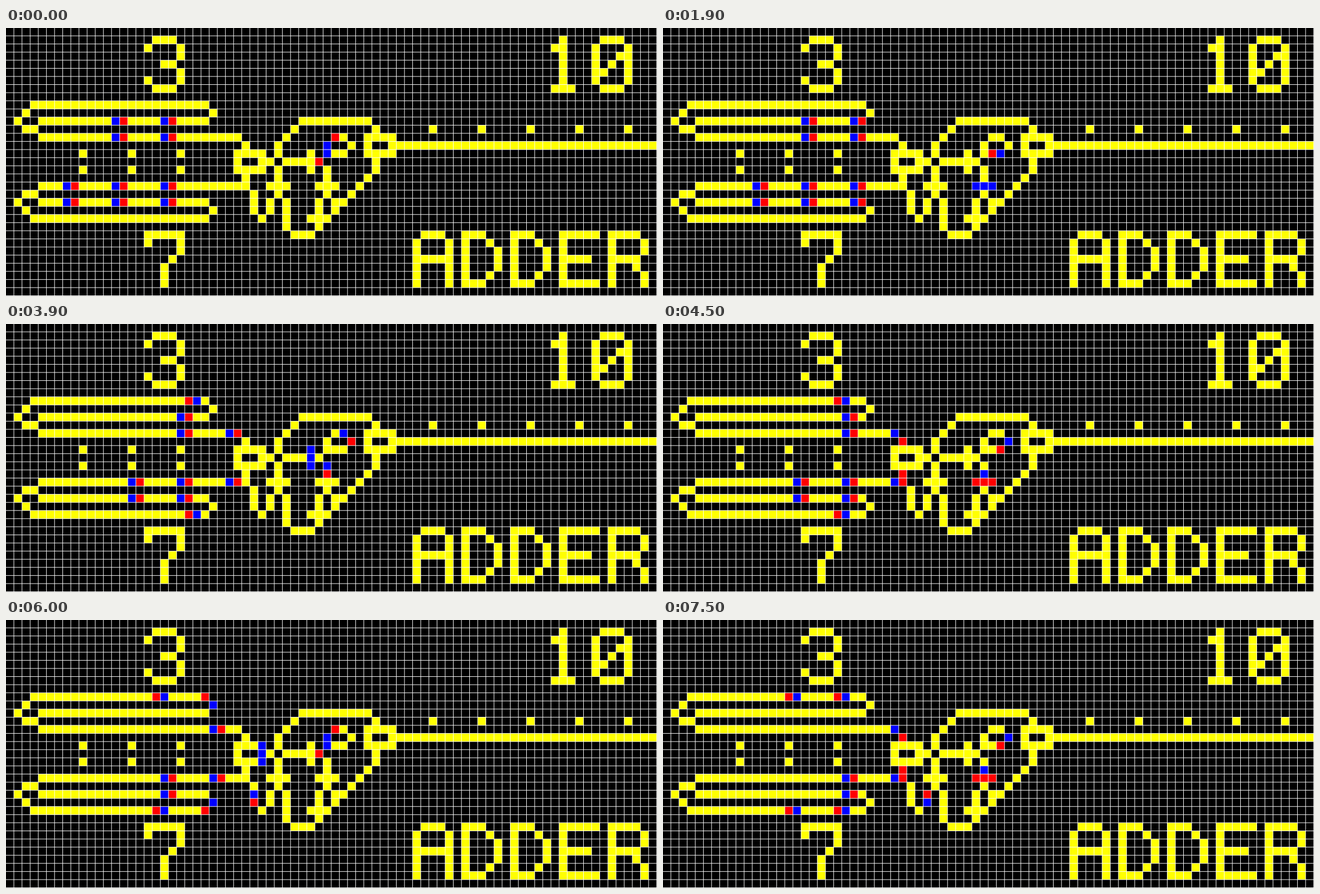
Write an HTML page with a canvas that moves like this. It is 1165 px wide and 481 px high and loops after 8000 ms.

```html
<!DOCTYPE html>
<html lang="en">
<head>
<meta charset="utf-8">
<title>Wireworld adder</title>
<style>
html, body { margin: 0; width: 100%; height: 100%; overflow: hidden; background: #000; }
canvas { display: block; }
</style>
</head>
<body>
<canvas id="stage" width="1165" height="481"></canvas>
<script>
const COLS = 80, ROWS = 33, CELL = 15, W = 1165, H = 481, LOOP = 8000;
const EMPTY = 0, WIRE = 1, HEAD = 2, TAIL = 3;
const COLORS = ['#000', '#ff0', '#f00', '#00f'];

// Single pen strokes in compass moves; digits start near the top, letters at the base.
const GLYPHS = {
  0: 'S4 SE E2 NE N4 NW W2 SW S4 NE3',
  1: 'NE S6 W E2',
  3: 'NE E2 SE S SW W E SE S SW W2 NW',
  7: 'N E4 S2 SW2 S2',
  A: 'N5 NE E2 SE S5 N3 W4',
  D: 'N6 E2 SE2 S2 SW2 W2',
  E: 'E4 W4 N3 E3 W3 N3 E4',
  R: 'N6 E3 SE S SW W3 E3 S SE S'
};

const at = (x, y) => y * COLS + x;

function build() {
  const grid = new Uint8Array(COLS * ROWS);

  const wire = (x, y, moves = '') => {
    grid[at(x, y)] = WIRE;
    for (const [, dir, count] of moves.matchAll(/([NESW]+)(\d*)/g)) {
      const dx = dir.includes('E') - dir.includes('W');
      const dy = dir.includes('S') - dir.includes('N');
      for (let i = 0; i < (count || 1); i++) grid[at(x += dx, y += dy)] = WIRE;
    }
  };
  const flip = moves => moves.replace(/[NS]/g, c => c === 'N' ? 'S' : 'N');
  const write = (text, x, y) => [...text].forEach((c, i) => wire(x + i * 6, y, GLYPHS[c]));
  const xor = (x, y) => wire(x, y, 'E3 S2 W3 N2');
  const bar = (x, y) => wire(x, y, 'E2');

  // mirrored input loops
  const input = 'E20 NE NW W21 SW2 SE E SE E24 SE';
  wire(4, 11, input);
  wire(4, 21, flip(input));

  // first half adder
  xor(28, 15);
  wire(28, 19, 'E SE S2 SE NE N NE');
  wire(31, 16, 'E NE N NE3 E8 SE');
  wire(32, 16, 'SE S3 SE S3 SE E2 NE8 N');
  bar(32, 19);

  // clock and carry loop
  wire(34, 16, 'E4 NE N NE E SE SW W');
  wire(37, 15, 'S2');
  wire(38, 16, 'SE S3 SE S SW NW N NE');
  bar(38, 19);
  bar(37, 23);

  // second half adder and output
  xor(44, 13);
  wire(47, 14, 'E32');

  for (const x of [9, 15, 21]) [15, 17].forEach(y => wire(x, y));
  for (let x = 52; x < COLS; x += 6) wire(x, 12);

  write('3', 17, 2);
  write('7', 17, 26);
  write('1', 67, 2);
  write('0', 72, 2);
  write('ADDER', 50, 31);

  const electron = (x, y, dx, dy) => {
    grid[at(x, y)] = HEAD;
    grid[at(x + dx, y + dy)] = TAIL;
  };
  for (const y of [11, 13, 19, 21])
    for (let x = y < 16 ? 14 : 8; x <= 20; x += 6) electron(x, y, -1, 0);
  electron(40, 13, -1, 1);
  electron(38, 16, 1, -1);
  return grid;
}

function next(grid) {
  const heads = (x, y) => {
    let n = 0;
    for (let j = Math.max(0, y - 1); j <= Math.min(ROWS - 1, y + 1); j++)
      for (let i = Math.max(0, x - 1); i <= Math.min(COLS - 1, x + 1); i++)
        if (grid[at(i, j)] === HEAD) n++;
    return n;
  };
  return grid.map((s, i) => {
    if (s === EMPTY) return EMPTY;
    if (s === HEAD) return TAIL;
    if (s === TAIL) return WIRE;
    const n = heads(i % COLS, Math.floor(i / COLS));
    return n === 1 || n === 2 ? HEAD : WIRE;
  });
}

const ctx = document.getElementById('stage').getContext('2d');
ctx.scale(W / (COLS * CELL), H / (ROWS * CELL));

function draw(grid) {
  ctx.fillStyle = '#fff';
  ctx.fillRect(0, 0, COLS * CELL, ROWS * CELL);
  grid.forEach((s, i) => {
    ctx.fillStyle = COLORS[s];
    ctx.fillRect(i % COLS * CELL, Math.floor(i / COLS) * CELL, CELL - 1, CELL - 1);
  });
}

// One generation every 514 ms, held to a 100 ms beat.
const changeAt = i => 300 + 100 * Math.ceil(i * 5.14);
const states = [build()];
for (let i = 0; changeAt(i) < LOOP; i++) states.push(next(states[i]));

let shown = -1;
const start = performance.now();
function tick() {
  const t = (performance.now() - start) % LOOP;
  let step = 0;
  while (step < states.length - 1 && changeAt(step) <= t) step++;
  if (step !== shown) draw(states[shown = step]);
  requestAnimationFrame(tick);
}
tick();
</script>
</body>
</html>
```
